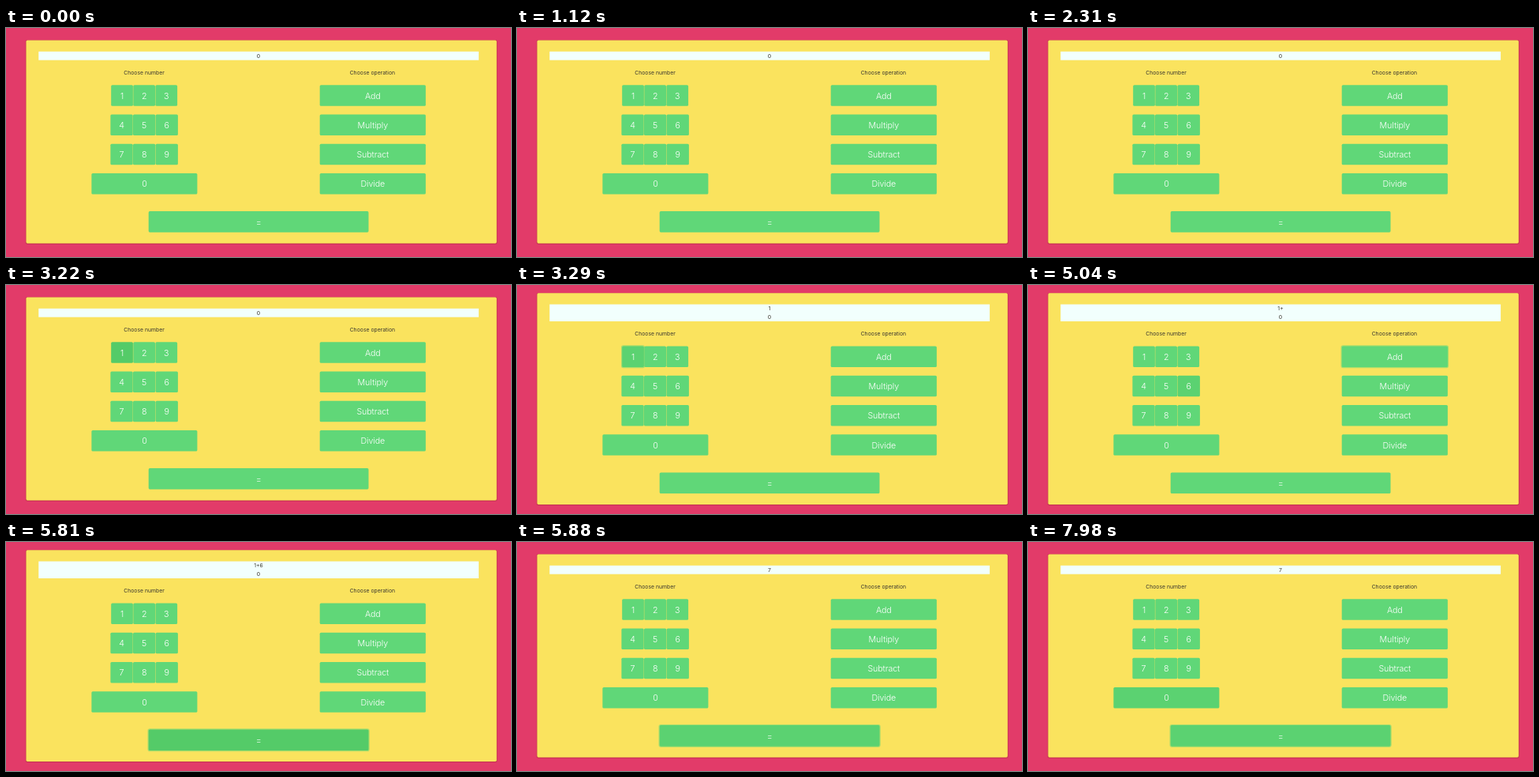
These frames come from a looping animation (640 px wide and 290 px high, 8000 ms). An HTML page:

```html
<!DOCTYPE html>
<html lang="en">
<head>
<meta charset="utf-8">
<title>Calculator</title>
<style>
  html, body { margin: 0; width: 100%; height: 100%; overflow: hidden; background: #e23b69; }
  svg { display: block; width: 640px; height: 290px; }
  text { font-family: Inter, "Noto Sans", sans-serif; text-anchor: middle; }
  .key { font-size: 10.7px; font-weight: 300; fill: #fff; letter-spacing: -0.1px; }
  .label { font-size: 6.85px; fill: #3b3830; }
</style>
</head>
<body>
<svg id="stage" viewBox="0 0 640 290"></svg>
<script>
const LOOP = 8000;
const SHIFT = 5.3;
const FILL = ['#60d778', '#5bd271', '#54cb68'];
const stage = document.getElementById('stage');

function add(parent, tag, attrs, content) {
  const el = document.createElementNS('http://www.w3.org/2000/svg', tag);
  for (const name in attrs) el.setAttribute(name, attrs[name]);
  if (content !== undefined) el.textContent = content;
  parent.appendChild(el);
  return el;
}

function label(parent, x, y, content) {
  return add(parent, 'text', { x, y, class: 'label' }, content);
}

add(stage, 'rect', { width: 640, height: 290, fill: '#e23b69' });
const shadow = add(stage, 'rect', { x: 24.8, width: 597.8, rx: 2, fill: '#a92f3c', opacity: 0.55 });
const panel = add(stage, 'rect', { x: 25.5, width: 596.3, rx: 1.7, fill: '#fae35e' });
const screen = add(stage, 'rect', { x: 41.3, width: 557.8, fill: '#f2fffd' });
const upper = label(stage, 320, 32.4, '');
const lower = label(stage, 320, 0, '');
const body = add(stage, 'g', {});
label(body, 175, 58.9, 'Choose number');
label(body, 464.4, 58.9, 'Choose operation');

const keys = {};
function key(name, x, y, width) {
  const box = { x, y, width, height: 26.6, rx: 1.6 };
  const ring = add(body, 'rect', {
    ...box, fill: 'none', stroke: '#60d778', 'stroke-width': 2.4, opacity: 0
  });
  const face = add(body, 'rect', box);
  add(body, 'text', { x: x + width / 2, y: y + 17.4, class: 'key' }, name);
  keys[name] = { ring, face };
}

const rowY = row => 72.2 + row * 37.25;
for (let n = 1; n <= 9; n++) {
  const row = Math.floor((n - 1) / 3), col = (n - 1) % 3;
  const left = row ? 132.4 : 133.2;
  key(String(n), left + col * (row ? 28.6 : 28.1), rowY(row), row ? 28.3 : 27.7);
}
key('0', 108.4, rowY(3), 134);
['Add', 'Multiply', 'Subtract', 'Divide'].forEach((name, row) => key(name, 397.7, rowY(row), 134.2));
key('=', 180.7, 232.1, 278.8);

// [time, value] steps; the latest one reached applies
const presses = {
  '1': [[3010, 1], [3220, 2], [3290, 1], [3640, 0]],
  'Add': [[4200, 1], [4340, 2], [4410, 1], [4830, 0]],
  '6': [[5040, 1], [5180, 2], [5250, 1], [5460, 0]],
  '=': [[5530, 1], [5810, 2], [5880, 1]],
  '0': [[7910, 1]]
};
const focus = [[3290, '1'], [4340, 'Add'], [5180, '6'], [5810, '=']];
const entry = [[3290, '1'], [4410, '1+'], [5250, '1+6'], [5880, '']];
const result = [[0, '0'], [5880, '7']];

function at(steps, time, start) {
  let value = start;
  for (const [when, next] of steps) if (time >= when) value = next;
  return value;
}

function span(el, y, height) {
  el.setAttribute('y', y);
  el.setAttribute('height', height);
}

function draw(time) {
  const typed = at(entry, time, '');
  const shift = typed ? SHIFT : 0;
  span(panel, 15.6 - shift, 257.1 + 2 * shift);
  span(shadow, 15.2 - shift, 258.5 + 2 * shift);
  span(screen, 29.8 - shift, 10.9 + 2 * shift);
  body.setAttribute('transform', `translate(0 ${shift})`);
  upper.textContent = typed;
  lower.textContent = at(result, time, '0');
  lower.setAttribute('y', 37.7 + shift);

  const focused = at(focus, time, '');
  for (const name in keys) {
    keys[name].face.setAttribute('fill', FILL[at(presses[name] || [], time, 0)]);
    keys[name].ring.setAttribute('opacity', name === focused ? 0.5 : 0);
  }
}

function frame() {
  draw(performance.now() % LOOP);
  requestAnimationFrame(frame);
}
frame();
</script>
</body>
</html>
```
